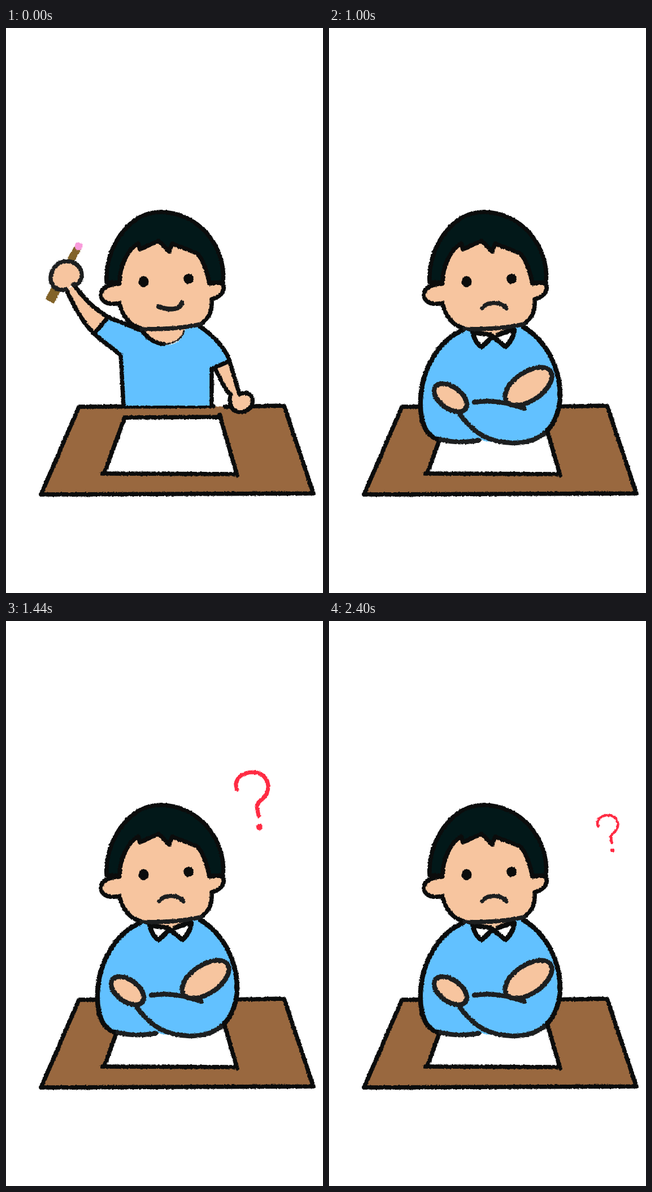
These frames come from a looping animation (561 px wide and 998 px high, 2800 ms). An HTML page without scripts:

```html
<!DOCTYPE html>
<html lang="en">
<head>
<meta charset="utf-8">
<title>Thinking at the desk</title>
<style>
  html, body { margin: 0; width: 100%; height: 100%; overflow: hidden; background: #fff; }
  svg { display: block; width: 100%; height: 100%; }

  .ink { fill: none; stroke: #0b0c0c; stroke-width: 7.5; stroke-linecap: round; stroke-linejoin: round; }
  .soft { stroke: #1d1f20; }
  .bold { stroke-width: 8.5; }
  .thin { stroke-width: 3; }
  .skin { fill: #f7c59f; }
  .shirt { fill: #62c1ff; }
  .hair { fill: #021819; }
  .wood { fill: #99683f; }
  .white { fill: #fff; }
  .dot { fill: #0b0c0c; }
  .pencil { stroke: #826329; fill: none; }
  .mark { fill: none; stroke: #ff2b43; stroke-width: 7; stroke-linecap: round; stroke-linejoin: round; }

  .happy, .puzzled, .near, .far { animation: 2800ms step-end infinite; }
  .happy { animation-name: happy; }
  .puzzled { animation-name: puzzled; }
  .near { animation-name: near; }
  .far { animation-name: far; }
  @keyframes happy { 0% { visibility: visible } 25%, 100% { visibility: hidden } }
  @keyframes puzzled { 0% { visibility: hidden } 25%, 100% { visibility: visible } }
  @keyframes near {
    0%, 57.143%, 85.714%, 100% { visibility: hidden }
    42.857%, 71.429% { visibility: visible }
  }
  @keyframes far {
    0%, 71.429% { visibility: hidden }
    57.143%, 85.714%, 100% { visibility: visible }
  }
</style>
</head>
<body>
<svg viewBox="0 0 561 998">
  <defs>
    <filter id="crayon" filterUnits="userSpaceOnUse" x="0" y="0" width="561" height="998" color-interpolation-filters="sRGB">
      <feTurbulence type="fractalNoise" baseFrequency=".3" numOctaves="2" seed="4"/>
      <feDisplacementMap in="SourceGraphic" scale="3.5" xChannelSelector="R" yChannelSelector="G"/>
    </filter>
    <g id="question">
      <path d="M409 298C402 283 415 267 437 267C460 268 468 288 462 303C457 317 443 318 444 328L447 344"/>
      <circle cx="448.5" cy="364" r="5.7" fill="#ff2b43" stroke="none"/>
    </g>
  </defs>

  <!-- Desk and paper -->
  <g filter="url(#crayon)">
    <path class="wood" d="M130 669L492 668L544 822L62 824Z"/>
    <path class="ink" d="M367 668L129 669L62 824L544 822L492 667L387 669"/>
    <path class="white" d="M210 688L380 687L408 788L174 787Z"/>
    <path class="ink" d="M170 787L408 788M174 786L210 688L380 687M378 683L409 790"/>
  </g>

  <!-- Raised arm pose -->
  <g class="happy" filter="url(#crayon)">
    <path class="skin" d="M107 462C120 490 135 520 156 540L180 512C155 495 140 480 122 454Z"/>
    <path class="skin" d="M370 601L396 589L414 647L398 650Z"/>
    <path class="shirt" d="M179 513L212 524L243 536C255 556 275 562 293 559C307 555 314 545 317 532L342 527C367 545 385 562 396 587L364 602V667H208L203 578L156 540Z"/>
    <path class="skin" d="M243 532C255 556 275 562 291 558C305 554 314 545 317 530Z"/>
    <path class="ink" d="M107 463C120 490 135 520 156 540L178 514M122 456C140 480 155 495 181 511L212 523L240 535M156 540C171 554 190 566 203 578L208 667M364 667V602L396 588C386 562 367 544 343 527"/>
    <path class="ink" d="M242 536C252 550 264 557 279 558"/>
    <path class="ink soft thin" d="M279 558C290 559 311 553 315 535"/>
    <path class="skin" d="M398 648C393 661 398 678 414 678C431 678 438 666 436 655C434 644 421 643 413 647Z"/>
    <path class="ink" d="M370 602C380 620 385 636 398 648C393 661 398 678 414 678C431 678 438 666 436 655C434 644 421 643 413 647L396 590"/>
    <path class="pencil" stroke-width="13" d="M127 388L109 420"/>
    <path class="pencil" stroke-width="17" d="M92 455L77 483"/>
    <circle cx="128.5" cy="385.5" r="7" fill="#f99bdb"/>
    <path class="ink soft" style="fill:#f7c59f" d="M106 462C88 465 78 454 79 440C81 422 94 412 108 412C124 412 134 424 134 437C133 449 126 454 119 453"/>
  </g>

  <!-- Folded arms pose -->
  <g class="puzzled" filter="url(#crayon)">
    <path class="shirt" d="M238 533C195 551 165 600 162 655C160 700 174 725 200 728C222 732 245 732 264 727C283 732 303 733 325 733C370 732 409 700 409 650C409 600 385 553 344 528Z"/>
    <path class="ink bold" d="M238 533C195 551 165 600 162 655C160 700 174 725 198 727M344 528C385 553 409 600 409 650C409 676 397 704 380 717"/>
    <path class="ink soft bold" d="M198 727C222 733 245 732 265 728M380 717C366 728 347 733 325 733C287 732 260 720 232 683M257 661C285 656 320 662 345 672"/>
    <ellipse class="ink soft bold" style="fill:#f7c59f" cx="215" cy="653" rx="33" ry="19" transform="rotate(36 215 653)"/>
    <ellipse class="ink soft bold" style="fill:#f7c59f" cx="353" cy="633" rx="47" ry="25" transform="rotate(-34 353 633)"/>
    <path class="skin" d="M255 530H328L313 540L292 545L265 540Z"/>
    <path class="white" d="M254 539L270 563L290 544L312 564L328 534L300 542H285Z"/>
    <path class="ink bold" d="M254 537C258 553 264 560 270 563L290 545L312 563C321 556 326 546 328 533M256 538L286 542M299 542L326 532"/>
  </g>

  <!-- Head -->
  <g filter="url(#crayon)">
    <path class="skin" d="M199 452C178 452 167 462 168 473C170 487 185 489 201 486C206 510 218 525 243 531C275 534 325 528 345 523C362 510 365 498 364 479C380 475 387 465 385 456C382 449 370 448 360 452L340 390L273 370L216 385Z"/>
    <path class="ink" style="fill:#021819" d="M178 449C174 398 211 325 273 325C340 325 390 385 384 450L360 450C355 430 350 410 338 398L294 381L289 395L270 376L237 391L234 380C216 392 201 418 201 450Z"/>
    <path class="ink" d="M199 452C178 452 167 462 168 473C170 487 185 489 201 486C206 510 218 525 240 531M345 523C362 510 365 498 364 479C380 475 387 465 385 456C382 449 370 448 360 452"/>
    <path class="ink soft" d="M240 531C275 534 325 528 345 523"/>
    <ellipse class="dot" cx="243.5" cy="448" rx="9" ry="10"/>
    <ellipse class="dot" cx="323" cy="443" rx="8.7" ry="9.3"/>
    <path class="ink soft bold happy" d="M270 492C285 498 308 500 311 485"/>
    <path class="ink soft puzzled" d="M271 495C279 483 304 482 314 495"/>
  </g>

  <g class="mark" filter="url(#crayon)">
    <use class="near" href="#question"/>
    <use class="far" href="#question" transform="translate(215.8 173) scale(.637)"/>
  </g>
</svg>
</body>
</html>
```
